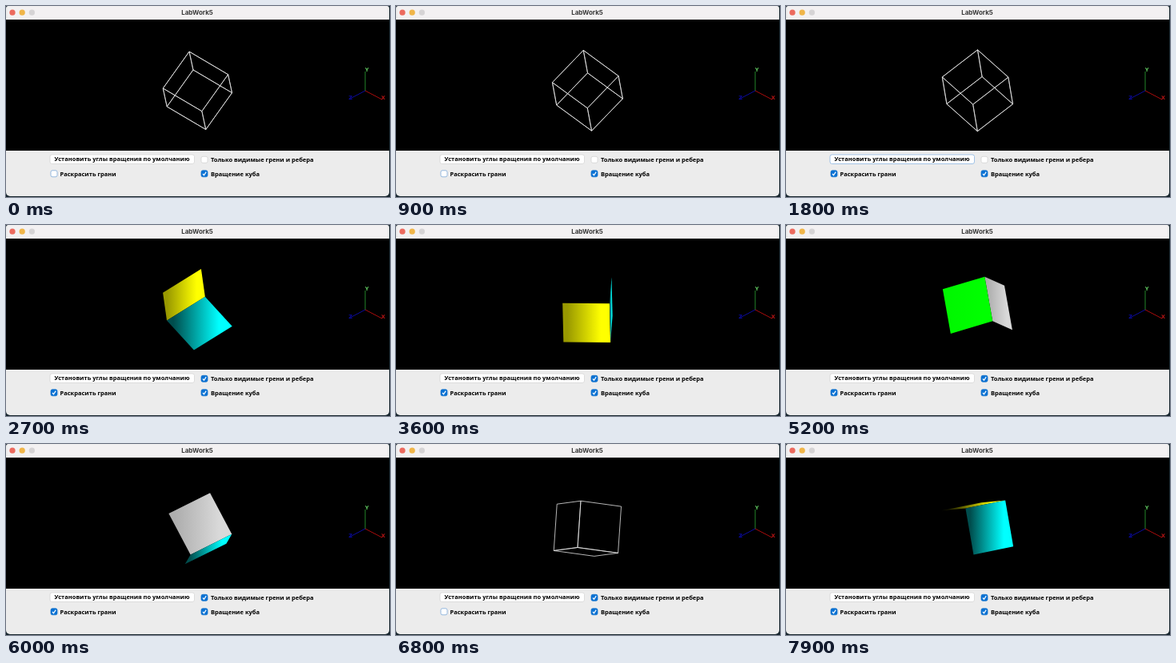
An HTML page with a canvas for the animation above (8 s loop, 480 px wide and 239 px high).

```html
<!DOCTYPE html>
<html lang="ru">
<head>
<meta charset="utf-8">
<title>LabWork5</title>
<style>
  html, body { margin: 0; width: 100%; height: 100%; overflow: hidden; background: #ececec; }
  canvas { position: absolute; left: 0; top: 0; width: 480px; height: 239px; }
  span { position: absolute; white-space: nowrap; color: #000; font: 600 7.5px/12px "Noto Sans", sans-serif; }
  .title { left: 0; width: 478px; top: 2px; text-align: center; color: #3a3a3a; font: 700 8px/12px Inter, sans-serif; }
  .row1 { top: 185.5px; }
  .row2 { top: 203.5px; }
  .button { left: 55px; width: 180px; top: 185px; text-align: center; }
</style>
</head>
<body>
<canvas id="stage"></canvas>
<span class="title">LabWork5</span>
<span class="button">Установить углы вращения по умолчанию</span>
<span class="row1" style="left:256px">Только видимые грени и ребера</span>
<span class="row2" style="left:67.5px">Раскрасить грани</span>
<span class="row2" style="left:256px">Вращение куба</span>
<script>
const W = 480, H = 239, LOOP = 8000, STEP = 100;
const canvas = document.getElementById('stage');
const ctx = canvas.getContext('2d');
const dpr = window.devicePixelRatio || 1;
canvas.width = W * dpr;
canvas.height = H * dpr;
ctx.scale(dpr, dpr);

// time, tilt about x, turn about y, spin about the cube's own z (degrees)
const POSES = [
  [0, 23, 4.8, -214],
  [1800, 35, 5.5, -49],
  [2700, 36.4, 4.8, 35.3],
  [4400, -12, 156.4, 184.2],
  [5200, -11.8, 155.2, 259.3],
  [6800, -184.5, 149.6, 445.5],
  [7900, -183, 149.6, 551.4],
  [8000, -182.9, 149.6, 561]
];
const PAINT_ON = 1500, VISIBLE_ON = 2200, PAINT_OFF = 6100, PAINT_AGAIN = 7100;
const CENTER = { x: 239.4, y: 105.8 }, HALF = 29.4;

const clamp = v => Math.max(0, Math.min(1, v));
const mix = (a, b, k) => a + (b - a) * k;
const smooth = k => k * k * (3 - 2 * k);

function poseAt(t) {
  let i = 0;
  while (i < POSES.length - 2 && t >= POSES[i + 1][0]) i++;
  const p = POSES[i], q = POSES[i + 1];
  const k = (t - p[0]) / (q[0] - p[0]);
  const rad = Math.PI / 180;
  return [mix(p[1], q[1], smooth(k)) * rad, mix(p[2], q[2], smooth(k)) * rad, mix(p[3], q[3], k) * rad];
}

function rotate([x, y, z], [a, b, c]) {
  const x1 = x * Math.cos(c) - y * Math.sin(c), y1 = x * Math.sin(c) + y * Math.cos(c);
  const x2 = x1 * Math.cos(b) + z * Math.sin(b), z2 = z * Math.cos(b) - x1 * Math.sin(b);
  return [x2, y1 * Math.cos(a) - z2 * Math.sin(a), y1 * Math.sin(a) + z2 * Math.cos(a)];
}

// axis, side, colour, brightness at the left and right ends
function facesAt(t) {
  const red = clamp(1 - Math.abs(t - 4400) / 800);
  const yellow = mix(0.6, 0.1, clamp((t - 4400) / 3500));
  return [
    [0, 1, [255, 0, 0], red, 0],
    [0, -1, [0, 0, 255], 0, 0],
    [1, 1, [255, 255, 0], yellow, 1],
    [1, -1, [255, 255, 255], 0.68, 0.85],
    [2, 1, [0, 255, 255], 0.3, 1],
    [2, -1, [0, 255, 0], 0.97, 1]
  ];
}

function corners(axis, side, pose) {
  return [[-1, -1], [1, -1], [1, 1], [-1, 1]].map(([u, v]) => {
    const p = [0, 0, 0];
    p[axis] = side;
    p[(axis + 1) % 3] = u;
    p[(axis + 2) % 3] = v;
    const r = rotate(p, pose);
    return [CENTER.x + HALF * r[0], CENTER.y - HALF * r[1]];
  });
}

function shade(pts, rgb, from, to) {
  const xs = pts.map(p => p[0]);
  const g = ctx.createLinearGradient(Math.min(...xs), 0, Math.max(...xs), 0);
  const tone = k => `rgb(${rgb.map(v => Math.round(v * k)).join()})`;
  g.addColorStop(0.1, tone(from));
  g.addColorStop(0.8, tone(to));
  return g;
}

function drawCube(t, paint, visibleOnly) {
  const pose = poseAt(t);
  for (const [axis, side, rgb, from, to] of facesAt(t)) {
    const normal = [0, 0, 0];
    normal[axis] = side;
    if (visibleOnly && rotate(normal, pose)[2] <= 0) continue;
    const pts = corners(axis, side, pose);
    ctx.beginPath();
    pts.forEach(p => ctx.lineTo(p[0], p[1]));
    ctx.closePath();
    if (paint && visibleOnly) {
      ctx.fillStyle = shade(pts, rgb, from, to);
      ctx.fill();
    } else {
      ctx.strokeStyle = '#e4e4e4';
      ctx.lineWidth = 0.8;
      ctx.stroke();
    }
  }
}

function drawAxes() {
  const arm = (x, y, color, name, tx, ty, ink) => {
    ctx.strokeStyle = color;
    ctx.lineWidth = 1;
    ctx.beginPath();
    ctx.moveTo(449, 106);
    ctx.lineTo(x, y);
    ctx.stroke();
    ctx.fillStyle = ink;
    ctx.fillText(name, tx, ty);
  };
  ctx.font = '700 6.5px "DejaVu Sans", sans-serif';
  ctx.textAlign = 'center';
  arm(449, 82, '#23862a', 'Y', 451, 81.5, '#5fc85f');
  arm(470, 117, '#a80c0c', 'X', 471.5, 117.2, '#b41414');
  arm(431, 115.5, '#0c0c9c', 'Z', 430.5, 117.4, '#0a0aa0');
}

function box(x, y, w, h, r, fill, edge) {
  ctx.beginPath();
  ctx.roundRect(x, y, w, h, r);
  ctx.fillStyle = fill;
  ctx.fill();
  ctx.strokeStyle = edge;
  ctx.lineWidth = 0.7;
  ctx.stroke();
}

function checkbox(x, y, on, focus) {
  box(x - 4, y - 4, 8, 8, 2, on ? '#0a72d4' : '#fff', on ? '#0a6cc8' : focus ? '#6ea0d6' : '#cfcfcf');
  if (!on) return;
  ctx.strokeStyle = '#fff';
  ctx.lineWidth = 1.2;
  ctx.beginPath();
  ctx.moveTo(x - 2, y + 0.2);
  ctx.lineTo(x - 0.5, y + 2);
  ctx.lineTo(x + 2.2, y - 2.2);
  ctx.stroke();
}

function drawWindow() {
  ctx.fillStyle = '#17262e';
  ctx.fillRect(0, 0, W, H);
  ctx.fillStyle = '#ececec';
  ctx.beginPath();
  ctx.roundRect(0, 0, 479, 238, [3, 3, 5, 5]);
  ctx.fill();
  ctx.fillStyle = '#f3f1f2';
  ctx.fillRect(2, 0.5, 475, 16.5);
  ctx.fillStyle = '#000';
  ctx.fillRect(0, 17, 479, 164);
  ['#ec6a5e', '#f0b549', '#d6d4d5'].forEach((color, i) => {
    ctx.fillStyle = color;
    ctx.beginPath();
    ctx.arc(8 + i * 12.2, 8.2, 3.6, 0, Math.PI * 2);
    ctx.fill();
  });
}

function draw(t) {
  const paint = (t >= PAINT_ON && t < PAINT_OFF) || t >= PAINT_AGAIN;
  const visibleOnly = t >= VISIBLE_ON;
  drawWindow();
  drawCube(t, paint, visibleOnly);
  drawAxes();
  const focus = t >= PAINT_ON && t < VISIBLE_ON;
  box(55, 186, 180.5, 11.5, 2.5, '#fff', focus ? '#7faee0' : '#d2d2d2');
  checkbox(248, 192.3, visibleOnly, false);
  checkbox(60, 209.8, paint, !paint);
  checkbox(248, 209.8, true, false);
}

let start = null;
function frame(now) {
  if (start === null) start = now;
  const t = (now - start) % LOOP;
  draw(Math.floor(t / STEP) * STEP);
  requestAnimationFrame(frame);
}
draw(0);
requestAnimationFrame(frame);
</script>
</body>
</html>
```
